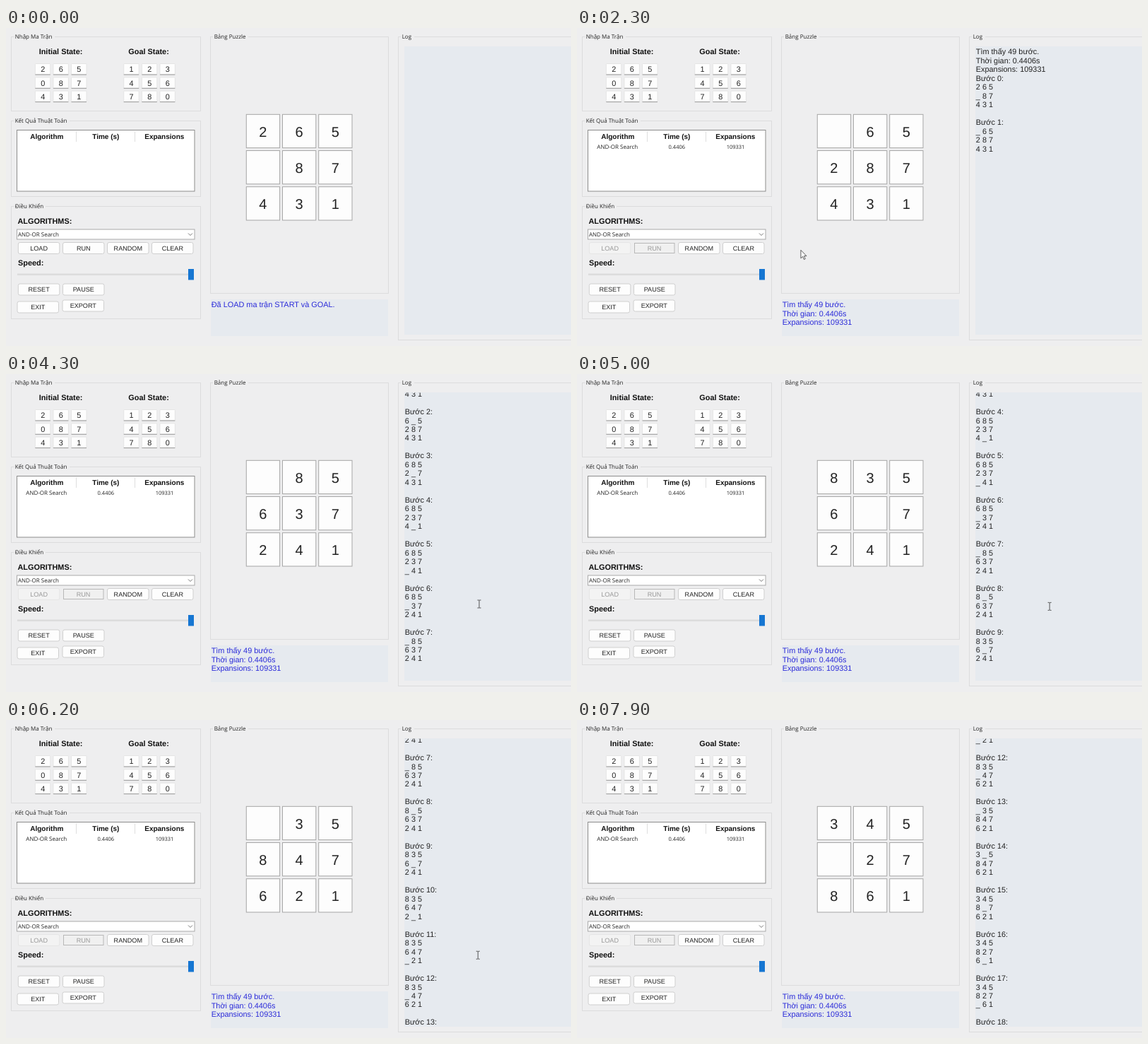
Write an HTML page that moves like this. It is 800 px wide and 450 px high and loops after 8 s.

```html
<!DOCTYPE html>
<html lang="vi">
<head>
<meta charset="utf-8">
<style>
  html, body { margin: 0; width: 100%; height: 100%; overflow: hidden; background: #eeeeef; }
  svg { display: block; }
  text { font: 10.9px "Liberation Sans", Arial, sans-serif; fill: #222; text-rendering: geometricPrecision; white-space: pre; }
  .ui { font: 8px "Open Sans", sans-serif; }
  .num { font: 7.5px "Open Sans", sans-serif; }
  .bold { font-weight: bold; fill: #111; }
  .head { font-weight: bold; font-size: 10px; fill: #111; }
  .btn { font-size: 9.1px; }
  .off { font-size: 9.1px; fill: #999; }
  .tile { font-size: 20px; }
  .info { fill: #2b2bd9; }
  .mid { text-anchor: middle; }
</style>
</head>
<body>
<svg width="800" height="450" viewBox="0 0 800 450">
  <clipPath id="view"><rect x="564" y="26.5" width="236" height="407.5"/></clipPath>
  <g id="base"></g>
  <g id="buttons"></g>
  <g id="board"></g>
  <g id="status"></g>
  <g id="log" clip-path="url(#view)"></g>
  <g id="cursor"></g>
</svg>
<script>
const LOOP = 8000, CLICK = 800, FOUND = 1690, STEP = 340;
const LINE = 12.48, BLOCK = LINE * 5;
const START = '265_87431', GOAL = '123456780';
const BLANKS = [3, 0, 1, 4, 7, 6];   // the gap circles the left 2x3 cells
const RESULT = ['Tìm thấy 49 bước.', 'Thời gian: 0.4406s', 'Expansions: 109331'];

const put = (id, html) => { document.getElementById(id).innerHTML = html; };
const rect = (x, y, w, h, fill, stroke = 'none', r = 0) =>
  `<rect x="${x}" y="${y}" width="${w}" height="${h}" rx="${r}" fill="${fill}" stroke="${stroke}"/>`;
const text = (x, y, s, cls = '') => `<text x="${x}" y="${y}" class="${cls}">${s}</text>`;
const line = (d, stroke, w = 1) => `<path d="${d}" fill="none" stroke="${stroke}" stroke-width="${w}"/>`;

function group(x, y, w, h, label, labelWidth) {
  return rect(x + .5, y + .5, w, h, 'none', '#dcdcdd') +
    rect(x + 4, y - 3, labelWidth + 4, 8, '#eeeeef') + text(x + 5.7, y + 3.2, label, 'ui');
}

function matrix(x, digits) {
  return [...digits].map((d, i) => {
    const cx = x + i % 3 * 25.6, cy = 50.5 + (i / 3 | 0) * 19.3;
    return rect(cx, cy, 21.5, 15.5, '#fdfdfd', '#e4e4e4', 1) +
      line(`M${cx} ${cy + 15.5}h21.5`, '#999') +
      text(cx + 10.9, cy + 11.7, d, 'mid');
  }).join('');
}

function button(x, y, label, off) {
  return rect(x, y, 58.5, 16, off ? '#f3f3f3' : '#fdfdfd', off ? '#e5e5e5' : '#cfcfcf', 2.5) +
    text(x + 29.3, y + 11.4, label, (off ? 'off' : 'btn') + ' mid');
}

function drawBase() {
  put('base',
    group(7, 12, 268, 105, 'Nhập Ma Trận', 54) +
    group(7, 131, 268, 107, 'Kết Quả Thuật Toán', 75) +
    group(7, 252, 268, 159, 'Điều Khiển', 41) +
    group(289, 12, 252, 363, 'Bảng Puzzle', 46) +
    group(555, 12, 265, 429, 'Log', 15) +
    text(46.7, 37.3, 'Initial State:', 'bold') + text(173.3, 37.3, 'Goal State:', 'bold') +
    matrix(41.3, START.replace('_', 0)) + matrix(166.7, GOAL) +
    rect(15.5, 144.5, 251.5, 86.5, '#fff', '#8c8c8c') +
    line('M99.5 146v15M182.5 146v15', '#dedede') +
    text(57.8, 156.6, 'Algorithm', 'head mid') + text(141.3, 156.6, 'Time (s)', 'head mid') +
    text(224.3, 156.6, 'Expansions', 'head mid') +
    text(16.5, 276.6, 'ALGORITHMS:', 'bold') +
    rect(15.5, 285, 251.5, 14, '#fff', '#aaa') +
    text(17, 295, 'AND-OR Search', 'ui') +
    line('M258 290.5l3 3l3-3', '#555', .8) +
    text(17, 335.6, 'Speed:', 'bold') +
    rect(16, 347.5, 250, 2.5, '#dcdcdc') + rect(258, 341, 8, 15.5, '#1676d2') +
    button(143.5, 303.5, 'RANDOM') + button(206.5, 303.5, 'CLEAR') +
    button(17.3, 362, 'RESET') + button(80.5, 362, 'PAUSE') +
    button(16, 387, 'EXIT') + button(80, 385, 'EXPORT') +
    rect(290, 384, 251, 52, '#e6eaef') + rect(564, 26, 236, 408, '#e6eaef'));
}

// All boards from the start up to the given step
function boardsTo(last) {
  const list = [START];
  for (let k = 1; k <= last; k++) {
    const b = [...list[k - 1]], from = BLANKS[(k - 1) % 6], to = BLANKS[k % 6];
    [b[from], b[to]] = [b[to], b[from]];
    list.push(b.join(''));
  }
  return list;
}

const rows = b => [0, 3, 6].map(i => [...b.slice(i, i + 3)].join(' '));
const scrollFor = k => Math.max(0, (k - 4) * BLOCK - 44.6);

function drawLog(boards, step, age) {
  const lines = [...RESULT];
  boards.forEach((b, k) => lines.push(`Bước ${k}:`, ...rows(b), ''));
  const settling = age >= 160 && age < 190 && step > 5;
  const scroll = age < 160 ? scrollFor(step - 1) : scrollFor(step) - (settling ? 7.4 : 0);
  let out = lines.map((s, i) => text(564.8, 37.4 + i * LINE - scroll, s)).join('');
  if (settling) {   // brief repaint leftovers at the lower edge
    const [, b, c] = rows(boards[step]);
    out += text(564.8, 428.2, b) + text(564.8, 440.7, c);
  }
  put('log', out);
}

// Pointer stops: time, x, y
const PATH = [[500, 98, 312], [1900, 98, 312], [2850, 668, 318], [3300, 668, 318],
  [4300, 670, 325.5], [5600, 668.5, 331.5], [6800, 668, 334], [7400, 668, 334]];

function drawCursor(t) {
  const i = PATH.findIndex(p => p[0] > t);
  if (i < 1) return put('cursor', '');
  const [t0, x0, y0] = PATH[i - 1], [t1, x1, y1] = PATH[i];
  const u = (t - t0) / (t1 - t0), e = u * u * (3 - 2 * u);
  const x = x0 + (x1 - x0) * e, y = y0 + (y1 - y0) * e;
  const shape = x > 564
    ? line('M-2.5-5.5H-.7L0-5L.7-5.5H2.5M0-5V5M-2.5 5.5H-.7L0 5L.7 5.5H2.5', '#444', .9)
    : '<path d="M0 0V11.5L2.7 9L4.5 13.2L6.3 12.4L4.5 8.3H8Z" fill="#fff" stroke="#333" stroke-width=".8"/>';
  put('cursor', `<g transform="translate(${x} ${y})">${shape}</g>`);
}

function draw(t) {
  const clicked = t >= CLICK, found = t >= FOUND;
  const step = found ? Math.floor((t - FOUND) / STEP) : 0;
  const boards = boardsTo(step);

  put('buttons', button(17.3, 303.5, 'LOAD', clicked) + (clicked
    ? rect(81.5, 304.5, 56.5, 14, '#f0f0f0', '#b8b8b8') + text(109.6, 314.9, 'RUN', 'off mid')
    : button(80.5, 303.5, 'RUN')) +
    (found ? text(57.3, 171, 'AND-OR Search', 'ui mid') + text(141.3, 171, '0.4406', 'num mid') +
      text(224.5, 171, '109331', 'num mid') : ''));

  put('board', [...boards[step]].map((d, i) => {
    const x = 340.3 + i % 3 * 51.2, y = 122.3 + (i / 3 | 0) * 51.2;
    return rect(x, y, 47.3, 47.3, '#fdfdfd', '#a6a6a6') +
      (d === '_' ? '' : text(x + 23.5, y + 31.2, d, 'tile mid'));
  }).join(''));

  const messages = found ? RESULT : [clicked ? 'Đang tìm lời giải...' : 'Đã LOAD ma trận START và GOAL.'];
  put('status', messages.map((s, i) => text(290.7, 395.4 + i * LINE, s, 'info')).join(''));

  if (found) drawLog(boards, step, (t - FOUND) % STEP);
  else put('log', '');
  drawCursor(t);
}

function tick() {
  draw(performance.now() % LOOP);
  requestAnimationFrame(tick);
}
drawBase();
tick();
</script>
</body>
</html>
```
